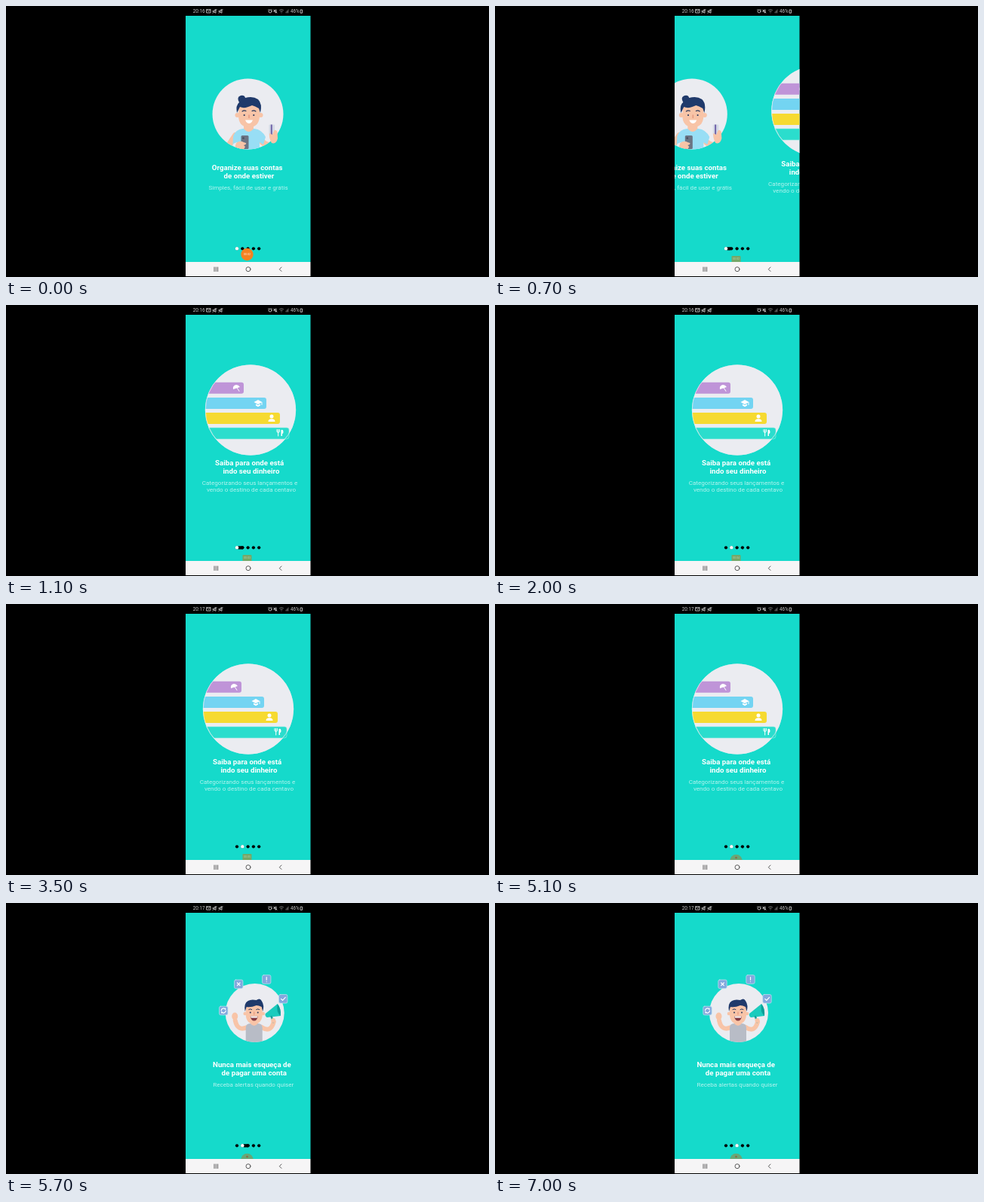
Recreate the animation shown at these times as an HTML page. Size 640 by 360 pixels, loop 8000 ms.

```html
<!DOCTYPE html>
<html lang="pt">
<head>
<meta charset="utf-8">
<style>
  html, body { margin: 0; width: 640px; height: 360px; overflow: hidden; background: #000; }
  svg { display: block; }
  text { font-family: Roboto, Arial, sans-serif; fill: #fff; }
  .title { font-size: 9.7px; font-weight: 700; text-anchor: middle; }
  .sub { font-size: 8.1px; text-anchor: middle; opacity: .68; }
  .status { font-size: 6.3px; fill: #c8c8c8; }
  .line { fill: none; stroke-linecap: round; stroke-linejoin: round; }
  .skin { fill: #f8c4a7; }
  .arm { stroke: #f8c4a7; }
  .hair { fill: #203a6b; }
  .white { fill: #fff; }
</style>
</head>
<body>
<svg width="640" height="360" viewBox="0 0 640 360">
  <defs>
    <clipPath id="screen"><rect x="238" y="13" width="165.5" height="327"/></clipPath>
    <clipPath id="disc1"><circle cx="320.5" cy="143.5" r="47"/></clipPath>
    <clipPath id="disc2"><circle cx="321" cy="139.5" r="60"/></clipPath>
    <clipPath id="disc3"><circle cx="323" cy="146" r="39"/></clipPath>
    <rect id="badge" x="-5.7" y="-5.8" width="11.4" height="11.6" rx="2" fill="#83a8de" stroke="#bfe4ee" stroke-width=".7"/>
  </defs>

  <rect x="238" y="13" width="165.5" height="327" fill="#15dacb"/>
  <g clip-path="url(#screen)">
    <g class="page">
      <circle cx="320.5" cy="143.5" r="47" fill="#ebecf1"/>
      <g clip-path="url(#disc1)">
        <path class="line arm" d="M304 172L296 184M340 181Q353 191 356 175" stroke-width="8"/>
        <path d="M300 192L301 173Q304 164 314 163H329Q339 164 344 174L341 184L336 181V192H306V181L301 183Z" fill="#98def5"/>
        <path class="skin" d="M315 156H328V163Q321.500 171 315 163Z"/>
        <rect x="311.500" y="172" width="10" height="18" rx="1.500" fill="#6b7484"/>
        <circle cx="314.500" cy="175.500" r="1.300" fill="#454d5d"/>
        <path class="skin" d="M305 182Q310 178 315 181L318 182Q319 184 315 185L317 187L314 192H302Z"/>
      </g>
      <rect x="348.500" y="157.500" width="7.500" height="14" rx="1" fill="#d4d9e5"/>
      <rect x="350.800" y="157.500" width="2" height="14" fill="#7064a9"/>
      <path class="skin" d="M349 169L353 171L355 166Q357 163 359.500 167L360 176Q358 184 352 182Q348 175 349 169Z"/>
      <circle class="skin" cx="306.500" cy="145" r="3"/>
      <circle class="skin" cx="337.500" cy="145" r="3"/>
      <path class="skin" d="M308 132H336V147Q335 161 322 161Q309 161 308 147Z"/>
      <path class="hair" d="M306 142Q304 132 309 128Q305 121 311 119Q316 118 317 122Q327 119 334 124Q340 130 337 142L335 136Q330 133 326 132Q316 137 310 134Z"/>
      <path class="line" d="M313 140Q315.500 138 318 139.500M326 139.500Q328.500 138 331 140" stroke="#28385c" stroke-width="1.100"/>
      <circle cx="315.700" cy="145" r="1.100" fill="#28385c"/>
      <circle cx="328.300" cy="145" r="1.100" fill="#28385c"/>
      <path class="line" d="M322 145V148.500" stroke="#e69c82" stroke-width="1.600"/>
      <path class="white" d="M317 151.500H327Q325 156 322 156Q319 156 317 151.500Z"/>
      <text class="title" x="319.700" y="218">Organize suas contas</text>
      <text class="title" x="322" y="229.300">de onde estiver</text>
      <text class="sub" x="321" y="244">Simples, fácil de usar e grátis</text>
    </g>

    <g class="page">
      <circle cx="321" cy="139.500" r="60" fill="#ebecf1"/>
      <g clip-path="url(#disc2)">
        <rect x="250" y="102.800" width="62" height="15" rx="3" fill="#bf94d8"/>
        <rect x="250" y="122.900" width="92" height="15" rx="3" fill="#73d4f2"/>
        <rect x="250" y="143" width="110" height="15" rx="3" fill="#f6da31"/>
      </g>
      <path d="M265.500 163H369Q372 163 372 166V175Q372 178 369 178H275Q269 171 265.500 163Z" fill="#2bddcd" stroke="#8de9e0" stroke-width=".6"/>
      <circle cx="321" cy="139.500" r="59.800" fill="none" stroke="#ebecf1" stroke-width=".7"/>
      <g class="white">
        <path d="M298 112Q297 107 302 106Q305 106 307 109Z"/>
        <path d="M325.500 129L331 126L336.500 129L331 132ZM328 131.500L331 133L334 131.500V133.500L331 135.200L328 133.500Z"/>
        <circle cx="349" cy="148" r="2.500"/>
        <path d="M344.500 155Q344.500 151.300 349 151.300T353.500 155Z"/>
        <path d="M361.500 174V166Q364.500 164.500 364.500 169Q364.500 171 363 171V174Z"/>
      </g>
      <path class="line" d="M302.500 109L306 114.500M336 129.500V132.500M356 165.500V168.500Q357.700 170.500 359.400 168.500V165.500M357.700 165.500V174" stroke="#fff"/>
      <text class="title" x="319.600" y="213">Saiba para onde está</text>
      <text class="title" x="322" y="224.300">indo seu dinheiro</text>
      <text class="sub" x="320" y="239.300">Categorizando seus lançamentos e</text>
      <text class="sub" x="322" y="248.300">vendo o destino de cada centavo</text>
    </g>

    <g class="page">
      <circle cx="323" cy="146" r="39" fill="#ebecf1"/>
      <path class="line arm" d="M313 165Q300 171 297 156M332 165Q344 173 348 158" stroke-width="6"/>
      <ellipse class="skin" cx="296.500" cy="150.500" rx="4" ry="5"/>
      <g clip-path="url(#disc3)">
        <path d="M311 190V166Q311 160 317 160H327Q333 160 333 166V190Z" fill="#b8bcc6"/>
      </g>
      <path class="skin" d="M317 155H327V160Q322 166 317 160Z"/>
      <path d="M337 147L353 134Q358 140 357 150L339 152Q336 150 337 147Z" fill="#1bcbbd"/>
      <path d="M353 134Q358 140 357 150Q351 145 353 134Z" fill="#0b9e98"/>
      <path class="line" d="M345 151L347.500 158" stroke="#169f9b" stroke-width="2.500"/>
      <circle class="skin" cx="347.500" cy="156" r="3"/>
      <circle class="skin" cx="310" cy="147" r="2.300"/>
      <circle class="skin" cx="334" cy="147" r="2.300"/>
      <path class="skin" d="M311 136H333V149Q332 160.500 322 160.500Q312 160.500 311 149Z"/>
      <path class="hair" d="M310 144Q308 133 314 130Q318 127.500 325 129Q330 125.500 332 130Q336 136 333.500 144L332 138Q328 136 325 136Q318 139 312 138Z"/>
      <path class="line" d="M315 141.500Q317 140 319 141.500M325 141.500Q327 140 329 141.500" stroke="#28385c"/>
      <circle cx="317" cy="145.500" r="1" fill="#28385c"/>
      <circle cx="327" cy="145.500" r="1" fill="#28385c"/>
      <path class="line" d="M322 145V148" stroke="#e69c82" stroke-width="1.300"/>
      <path d="M317 150.500H327Q326 156.500 322 156.500T317 150.500Z" fill="#843b43"/>
      <path class="white" d="M317.300 150.500H326.700L326 152.500H318Z"/>
      <g class="line" stroke="#fff" stroke-width="1.200">
        <g transform="translate(301.500 107.800)"><use href="#badge"/><path d="M-1.800-1.800L1.800 1.800M1.800-1.800L-1.800 1.800"/></g>
        <g transform="translate(338.500 101.500)"><use href="#badge"/><path d="M0-3V.700M0 3V3.100"/></g>
        <g transform="translate(360.500 127.300)"><use href="#badge"/><path d="M-2.700 0L-.700 2L3-2"/></g>
        <g transform="translate(281.500 143)"><use href="#badge"/><path d="M-3 0A3 3 0 0 1 2.500-1.700V-3M3 0A3 3 0 0 1-2.500 1.700V3"/></g>
      </g>
      <text class="title" x="319.200" y="218">Nunca mais esqueça de</text>
      <text class="title" x="322" y="229.300">de pagar uma conta</text>
      <text class="sub" x="321" y="244">Receba alertas quando quiser</text>
    </g>

    <g id="dots"></g>
    <path id="pill" class="line" stroke="#000" stroke-width="4.200"/>
    <circle id="active" class="white" cy="322.300" r="2.200"/>

    <g id="button">
      <circle id="knob" r="8.200"/>
      <rect id="tab" x="-6" y="-9" width="12" height="12" rx="1" fill="#75a768"/>
      <text id="timer" y="1" font-size="3.600" text-anchor="middle"></text>
      <circle id="rec" cy="-4" r="1.300" fill="#8d6847"/>
    </g>
  </g>

  <text id="clock" class="status" x="247.800" y="9.200"></text>
  <g class="line" stroke="#c8c8c8" stroke-width=".9">
    <path d="M266 4.700H271V9H266ZM266 4.700L268.500 7L271 4.700"/>
    <path id="mute" d="M274 7L278 4.500V9.300L274 7M274 9.500L279 4.500M282 7L286 4.500V9.300L282 7M282 9.500L287 4.500"/>
    <circle cx="350" cy="7" r="2"/>
    <path d="M348 4.500L347.500 5M352 4.500L352.500 5M355 7L358 4.800V9.200L355 7M355 5L359 9"/>
    <path d="M362.500 5.500Q365 3.800 367.500 5.500M363.800 7.300Q365 6.500 366.200 7.300M365 9V9.100" opacity=".65"/>
    <path d="M371 9V8M372.500 9V6.500M374 9V5" opacity=".6"/>
    <path d="M390.500 5H392.500V9.300H390.500Z"/>
  </g>
  <text class="status" x="377" y="9.200">46%</text>

  <rect x="238" y="340" width="165.500" height="19" fill="#f6f5f6"/>
  <g class="line" stroke="#4b4b4b" stroke-width=".9">
    <path d="M276 347V352.500M278.300 347V352.500M280.600 347V352.500M365 347L362.300 349.700L365 352.400"/>
    <circle cx="321" cy="349.700" r="3"/>
  </g>
</svg>
<script>
  const WIDTH = 165, LOOP = 8000;
  const $ = id => document.getElementById(id);
  const set = (id, attrs) => {
    for (const key in attrs) $(id).setAttribute(key, attrs[key]);
  };
  const pages = [...document.querySelectorAll('.page')];
  const dotX = i => 306 + i * 7.3;
  const clamp = v => Math.max(0, Math.min(1, v));

  $('dots').innerHTML = [0, 1, 2, 3, 4]
    .map(i => `<circle cx="${dotX(i)}" cy="322.3" r="2.1"/>`).join('');

  // Swipe that starts gently and settles without overshoot
  function swipe(t, start, scale) {
    const u = Math.max(0, t - start) / scale;
    const p = 1 - Math.exp(-u * u);
    return p > .997 ? 1 : p;
  }

  function drawDots(pos) {
    const i = Math.floor(pos), p = pos - i;
    set('active', { cx: dotX(i) });
    set('pill', {
      d: `M${dotX(i) + 2.3} 322.3H${dotX(i) + 2.3 + 5 * clamp(p * 2)}`,
      visibility: p ? 'visible' : 'hidden'
    });
  }

  function drawButton(t) {
    const tuck = clamp((t - 100) / 500);
    const docked = tuck === 1, half = t >= 5050;
    const show = on => on ? 'visible' : 'hidden';
    set('button', { transform: `translate(319.5 ${330 + 11 * tuck})` });
    set('knob', {
      fill: docked ? '#68a777' : '#f48221',
      opacity: docked ? 1 : 1 - .5 * tuck,
      visibility: show(!docked || half)
    });
    set('tab', { visibility: show(docked && !half) });
    set('rec', { visibility: show(half) });
    set('timer', {
      y: docked ? -4 : 1, opacity: docked ? .45 : .9, visibility: show(!half)
    });
    $('timer').textContent = '00:0' + (2 + Math.floor(t / 1000));
  }

  function draw(t) {
    const pos = swipe(t, 500, 300) + swipe(t, 5345, 199);
    pages.forEach((page, i) =>
      page.setAttribute('transform', `translate(${(i - pos) * WIDTH} 0)`));
    drawDots(pos);
    drawButton(t);
    $('clock').textContent = t < 2500 ? '20:16' : '20:17';
  }

  const began = performance.now();
  function tick() {
    draw((performance.now() - began) % LOOP);
    requestAnimationFrame(tick);
  }
  tick();
</script>
</body>
</html>
```
